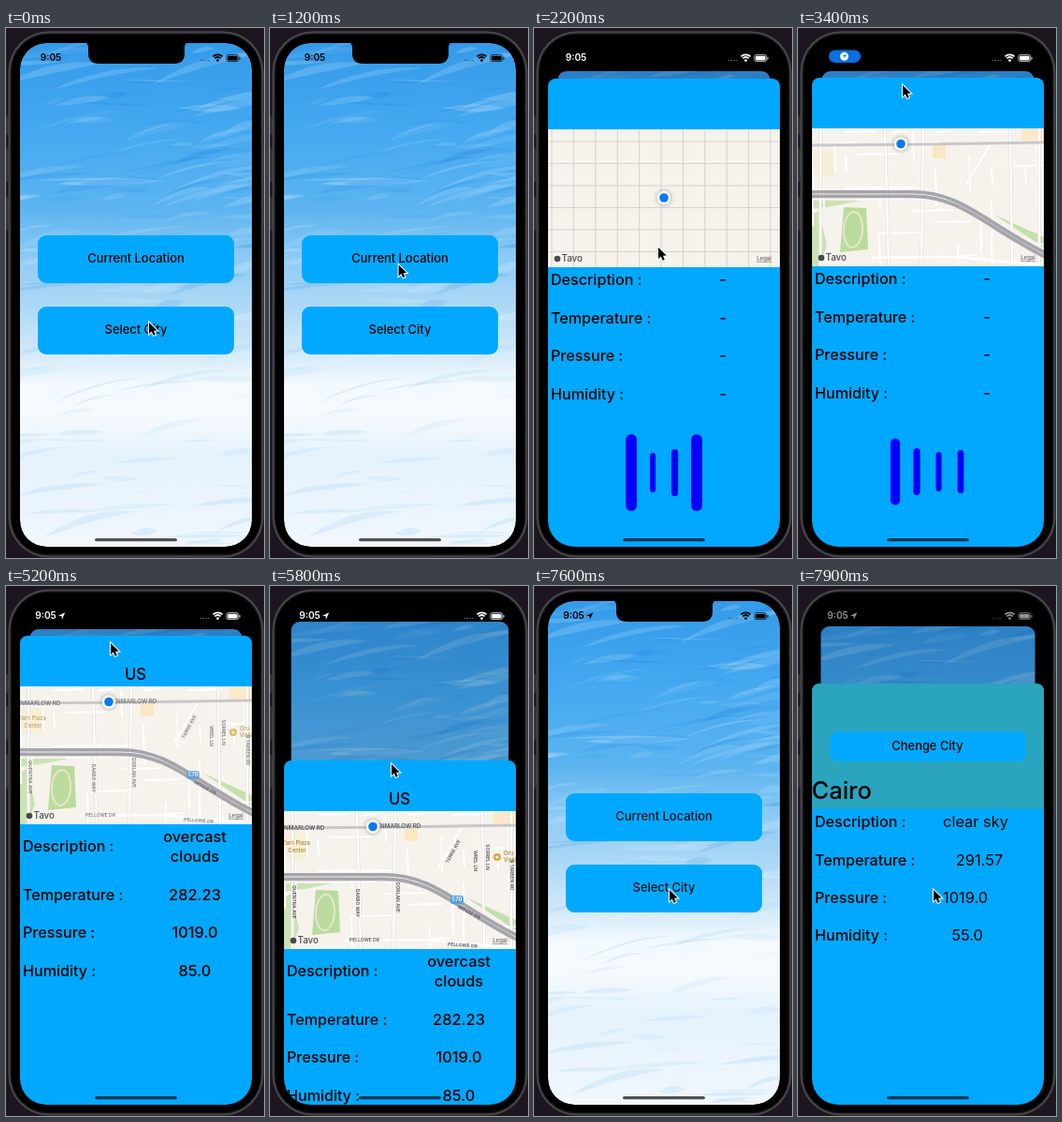
An HTML page with a canvas for the animation above (8 s loop, 276 px wide and 565 px high).

```html
<!DOCTYPE html>
<html lang="en">
<head>
<meta charset="utf-8">
<title>Weather app</title>
<style>
  html, body { margin: 0; width: 100%; height: 100%; overflow: hidden; background: #1d1620; }
  canvas { display: block; width: 276px; height: 565px; }
</style>
</head>
<body>
<canvas id="stage"></canvas>
<script>
const W = 276, H = 565, LOOP = 8000;
const SCREEN = { x: 15, y: 16, w: 248, h: 537 };
const REST = 53, BLUE = '#00a9ff', FONT = 'Inter, Roboto, sans-serif';
const dpr = window.devicePixelRatio || 1;

function makeCanvas(canvas) {
  canvas.width = W * dpr;
  canvas.height = H * dpr;
  const context = canvas.getContext('2d');
  context.scale(dpr, dpr);
  return context;
}
const g = makeCanvas(document.getElementById('stage'));

// The picture only moves inside these spans, in steps of 100 ms.
const ACTIVE = [[0, 0], [200, 1900], [2100, 2200], [2900, 3000], [3300, 3400], [3800, 3900], [4100, 4100],
  [4400, 4700], [4900, 5200], [5600, 5800], [6200, 6200], [6500, 6500], [7500, 7900]];

function heldTime(ms) {
  const span = ACTIVE.filter(([start]) => start <= ms).pop();
  return Math.min(Math.floor(ms / 100) * 100, span[1]);
}

const CURSOR = [[200, 153, 314], [1500, 133, 234], [2200, 133, 234], [3000, 120, 110], [3300, 112, 61],
  [5500, 112, 61], [5800, 130, 190], [6200, 132, 194], [6500, 141, 401], [7400, 141, 401], [7600, 145, 324]];
const SHEET_TOP = [[1600, 553], [1700, 465], [1800, 267], [1900, 134], [2100, 58], [2200, 54], [2900, 53],
  [5500, 53], [5800, 186], [6200, 190], [6500, 406], [7400, 406], [7500, 553], [7600, 553], [7700, 465],
  [7800, 262], [7900, 104]];
const HOME_TEXT = [[1500, 1], [1800, .65], [2100, .3], [6500, .3], [7500, 1], [7700, .8], [7900, .4]];
const LABELS = [[4100, 0], [4400, .3], [5200, .75], [5600, 1]];

function track(keys, t, column = 1) {
  const next = keys.findIndex(key => key[0] > t);
  if (next === 0) return keys[0][column];
  if (next < 0) return keys[keys.length - 1][column];
  const a = keys[next - 1], b = keys[next];
  return a[column] + (b[column] - a[column]) * (t - a[0]) / (b[0] - a[0]);
}

function box(c, x, y, w, h, r, fill) {
  c.beginPath();
  c.roundRect(x, y, w, h, r);
  c.fillStyle = fill;
  c.fill();
}

function circle(x, y, r, fill) {
  g.beginPath();
  g.arc(x, y, r, 0, 7);
  g.fillStyle = fill;
  g.fill();
}

function path(points, color, width, closed) {
  g.beginPath();
  points.forEach(([x, y]) => g.lineTo(x, y));
  if (closed) {
    g.closePath();
    g.fillStyle = color;
    g.fill();
  } else {
    g.strokeStyle = color;
    g.lineWidth = width;
    g.stroke();
  }
}

function text(str, x, y, size, { color = '#000', weight = 500, align = 'center', turn = 0 } = {}) {
  g.save();
  g.translate(x, y);
  g.rotate(turn * Math.PI / 180);
  g.font = `${weight} ${size}px ${FONT}`;
  g.textAlign = align;
  g.textBaseline = 'middle';
  g.fillStyle = color;
  g.fillText(str, 0, 0);
  g.restore();
}

function clipTo(x, y, w, h, r) {
  g.beginPath();
  g.roundRect(x, y, w, h, r);
  g.clip();
}

function randomFrom(seed) {
  return () => (seed = seed * 16807 % 2147483647) / 2147483647;
}

// Painted sky, brushed once and reused.
const sky = document.createElement('canvas');
function paintSky() {
  const c = makeCanvas(sky), rnd = randomFrom(77);
  const fill = c.createLinearGradient(0, 16, 0, 553);
  [[0, '#359ae8'], [.16, '#43a8f0'], [.33, '#5cb4f0'], [.42, '#8bcaf5'], [.52, '#acd8f6'], [.61, '#d0e8f9'],
    [.68, '#f5fafe'], [.74, '#f6fafe'], [.82, '#e5f2fc'], [1, '#f1f7fd']].forEach(s => fill.addColorStop(...s));
  c.fillStyle = fill;
  c.fillRect(0, 0, W, H);
  for (let i = 0; i < 230; i++) {
    const x = rnd() * 290 - 30, y = 10 + rnd() * 545, length = 25 + rnd() * 95, rise = length * (rnd() * .35 - .05);
    const thick = 1 + rnd() * 7, upper = y < 300, light = rnd() < (upper ? .55 : .6);
    const alpha = (upper ? .07 : .13) + rnd() * .14;
    c.beginPath();
    c.moveTo(x, y);
    c.quadraticCurveTo(x + length * .5, y - rise - thick, x + length, y - rise);
    c.quadraticCurveTo(x + length * .6, y - rise + thick, x, y);
    c.fillStyle = light ? `rgba(225,243,255,${alpha})` : upper ? `rgba(20,125,220,${alpha})` : `rgba(150,205,242,${alpha})`;
    c.fill();
  }
}

function drawHome(t, top) {
  const progress = (top - REST) / 500, scale = 1 - .085 * (1 - progress), raised = progress < .99;
  g.save();
  g.translate(139, 16 + 30 * (1 - progress));
  g.scale(scale, scale);
  g.translate(-139, -16);
  clipTo(SCREEN.x, SCREEN.y, SCREEN.w, SCREEN.h, raised ? 10 : 28);
  g.drawImage(sky, 0, 0, W, H);
  const color = `rgba(0,0,0,${track(HOME_TEXT, t)})`;
  [['Current Location', 221], ['Select City', 297]].forEach(([label, y]) => {
    box(g, 34, y, 210, 51, 9, BLUE);
    text(label, 139, y + 25.5, 12.9, { color });
  });
  g.fillStyle = `rgba(10,20,40,${.2 * (1 - progress)})`;
  g.fillRect(0, 0, W, H);
  g.restore();
}

function drawGrid() {
  for (let x = 4; x < 248; x += 23.4) path([[x, 0], [x, 147]], '#d6d3d0', 1);
  for (let y = 13; y < 147; y += 23.5) path([[0, y], [248, y]], '#d6d3d0', 1);
}

function drawFreeway(offset) {
  g.beginPath();
  g.moveTo(0, 70 + offset);
  g.lineTo(105, 70 + offset);
  g.bezierCurveTo(160, 69 + offset, 185, 103 + offset, 250, 135 + offset);
  g.lineWidth = 3.6;
  g.strokeStyle = '#a5a5ab';
  g.stroke();
}

function drawRoads() {
  const rnd = randomFrom(41);
  box(g, 129, 17, 14, 15, 1, '#fae8c4');
  box(g, 224, 0, 24, 14, 1, '#fbe9c9');
  box(g, 0, 23, 26, 28, 1, '#f8efd9');
  path([[0, 92], [7, 88], [16, 125], [8, 147], [0, 147]], '#cbe3b4', 0, true);
  path([[34, 84], [58, 85], [60, 129], [30, 132]], '#b9dc9c', 0, true);
  path([[0, 77], [52, 77], [22, 83], [0, 86]], '#cbe3b4', 0, true);
  path([[195, 92], [248, 116], [248, 127]], '#c4e0aa', 0, true);
  g.beginPath();
  g.ellipse(44, 108, 10, 19, .06, 0, 7);
  g.lineWidth = 2;
  g.strokeStyle = '#e9e3cb';
  g.stroke();
  for (let i = 0; i < 46; i++) {
    const x = Math.floor(rnd() * 22) * 12, y = 4 + Math.floor(rnd() * 12) * 12, length = 15 + rnd() * 38;
    if (x < 64 && y > 76 && y < 136) continue;
    path(rnd() < .5 ? [[x, y], [x + length, y - 1]] : [[x, y], [x + 1, y + length]], '#fff', 1.8);
  }
  [[9, 0], [78, 4], [119, -2], [212, 2], [243, 0]].forEach(([x, lean]) => {
    path([[x, 0], [x + lean, 147]], '#dedbd9', 3.4);
    path([[x, 0], [x + lean, 147]], '#fff', 2.4);
  });
  path([[165, 60], [190, 18]], '#fff', 2);
  path([[64, 138], [150, 137], [248, 146]], '#fff', 2.4);
  path([[0, 18], [120, 17], [248, 15]], '#c9c8ca', 3.2);
  drawFreeway(-2.2);
  drawFreeway(2.4);
}

function drawLabels(alpha) {
  const street = { color: '#55555a', weight: 600 }, place = { color: '#a8842f', weight: 500 };
  g.globalAlpha = alpha;
  [['FENMARLOW RD', 121, 16, 6.2, 0], ['FENMARLOW RD', 18, 18, 6.2, 0], ['TERNE AVE', 181, 43, 5, -62],
    ['WREL LN', 204, 53, 5, 90], ['SORREL LN', 217, 49, 5, 90], ['N TARBEN RD', 243, 68, 5, 90],
    ['QUENTRA AVE', 10, 97, 5, 90], ['DARBO WAY', 78, 98, 5, 90], ['DORLAN AVE', 121, 92, 5, 90],
    ['PELLOWE DR', 86, 137, 5, 0], ['MOSSE DR', 198, 108, 5, 28], ['PELLOWE DR', 191, 143, 5, 4]]
    .forEach(([name, x, y, size, turn]) => text(name, x, y, size, { ...street, turn }));
  text('Tarn Plaza', 28, 34, 6, { ...place, align: 'right' });
  text('Center', 14, 42, 6, place);
  circle(228, 49, 4, '#d6a83c');
  circle(228, 49, 1.6, '#fff');
  text('Oru', 235, 45, 6, { ...place, align: 'left' });
  text('Vista', 235, 52, 6, { ...place, align: 'left' });
  box(g, 178, 90, 14, 9, 3, '#4da3d8');
  text('570', 185, 94.7, 6, { color: '#fff', weight: 600 });
  g.globalAlpha = 1;
}

function drawMap(t, top) {
  const loaded = t >= 2900, drift = t >= 6500 ? -2 : 0;
  g.save();
  g.translate(15, top + 54);
  clipTo(0, 0, 248, 147, 0);
  g.fillStyle = '#f6f2ec';
  g.fillRect(0, 0, 248, 147);
  g.save();
  g.translate(drift, 0);
  if (loaded) drawRoads(); else drawGrid();
  if (loaded) drawLabels(track(LABELS, t));
  if (t >= 2100) {
    const [x, y] = loaded ? [95, 16.5] : [124, 73];
    g.shadowColor = 'rgba(0,0,0,.35)';
    g.shadowBlur = 5 * dpr;
    circle(x, y, 7.3, '#fff');
    g.shadowColor = 'transparent';
    circle(x, y, 4.8, '#087af2');
  }
  g.restore();
  circle(10, 138, 3.3, '#4a4a4c');
  text('Tavo', 14.5, 138, 9.8, { color: '#4a4a4c', align: 'left' });
  text('Legal', 231, 138.5, 6, { color: '#666' });
  path([[223, 141.5], [239, 141.5]], '#777', .6);
  g.restore();
}

function drawRows(top, ys) {
  ['Description :', 'Temperature :', 'Pressure :', 'Humidity :'].forEach((label, i) =>
    text(label, 18, top + ys[i], 16.1, { align: 'left' }));
}

function drawBars(t, top) {
  const phase = (t - 2200) / 1200;
  [[104, 0, 7.38], [127, Math.PI, 7.21], [150.5, 2.21, 7.21], [174, 0, 8.78]].forEach(([x, start, speed]) => {
    const h = 62 + 20 * Math.cos(start + phase * speed), w = h * .145;
    box(g, x - w / 2, top + 420 - h / 2, w, h, w / 2, '#0000ff');
  });
}

function openSheet(top) {
  clipTo(SCREEN.x, top, SCREEN.w, 560, [8, 8, 0, 0]);
  g.fillStyle = BLUE;
  g.fillRect(0, top, W, 560);
}

function drawLocationSheet(t, top) {
  const ready = t >= 4400;
  g.save();
  openSheet(top);
  drawMap(t, top);
  drawRows(top, ready ? [225.5, 277, 317, 358] : [215.5, 256, 296.5, 337]);
  if (ready) {
    text('US', 138.5, top + 41.5, 16.7);
    [['overcast', 215.5], ['clouds', 236.5], ['282.23', 277], ['1019.0', 317], ['85.0', 358]]
      .forEach(([value, y]) => text(value, 202, top + y, 16.4));
  } else {
    [215.5, 256, 296.5, 337].forEach(y => text('-', 202, top + y, 16.4));
    drawBars(t, top);
  }
  g.restore();
}

function drawCitySheet(top) {
  g.save();
  openSheet(top);
  g.fillStyle = '#2ba4bd';
  g.fillRect(0, top, W, 133.5);
  box(g, 34, top + 51, 210, 32, 9, BLUE);
  text('Chenge City', 138.5, top + 67.5, 12.9);
  text('Cairo', 14.5, top + 115, 25.5, { align: 'left' });
  drawRows(top, [148.5, 189, 229, 269.5]);
  [['clear sky', 190, 148.5], ['291.57', 194, 189], ['1019.0', 179, 229], ['55.0', 181, 269.5]]
    .forEach(([value, x, y]) => text(value, x, top + y, 16.4, { weight: 400 }));
  g.restore();
}

function statusColor(t) {
  if (t < 1700) return '#000';
  if (t < 1900) return 'rgba(20,30,45,.75)';
  if (t < 2100) return '#888';
  if (t < 6500) return '#fff';
  if (t < 7500) return 'rgba(255,255,255,.62)';
  return t < 7800 ? '#000' : '#8f9296';
}

function drawArrow(x, y, size, color) {
  path([[x + size, y - size], [x + size * .1, y + size], [x, y], [x - size, y - size * .1]], color, 0, true);
}

function drawStatus(t) {
  const color = statusColor(t);
  if (t >= 3300 && t < 3800) {
    box(g, 33, 23.5, 34, 13.5, 6.7, '#0a6fe0');
    circle(49.5, 30.3, 4.5, '#fff');
    drawArrow(49.5, 30.3, 2.3, '#0a6fe0');
  } else {
    const located = t >= 4100;
    text('9:05', located ? 42.5 : t >= 2100 ? 45 : 48, 32.3, 10.2, { color, weight: 600 });
    if (located) drawArrow(59.5, 32, 3.7, color);
  }
  g.globalAlpha = .4;
  if (t < 6500 || t >= 7500) for (let i = 0; i < 4; i++) circle(208.5 + i * 2.8, 34.5, .8, color);
  g.globalAlpha = 1;
  g.strokeStyle = color;
  g.lineWidth = 1.7;
  [4.8, 7.6].forEach(r => {
    g.beginPath();
    g.arc(226.5, 36, r, -2.3, -.84);
    g.stroke();
  });
  circle(226.5, 34.6, 1.4, color);
  g.lineWidth = .7;
  g.beginPath();
  g.roundRect(235.8, 28.6, 13, 7, 2.2);
  g.stroke();
  box(g, 237, 29.8, 10.6, 4.6, 1.2, color);
  box(g, 249.5, 31, 1, 2.4, .5, color);
}

function drawCursor(x, y) {
  g.save();
  g.translate(x, y);
  g.beginPath();
  [[0, 0], [0, 12], [2.8, 9.6], [4.7, 13.8], [6.8, 12.9], [5, 8.7], [8.7, 8.6]].forEach(([px, py]) => g.lineTo(px, py));
  g.closePath();
  g.lineWidth = 2;
  g.strokeStyle = '#fff';
  g.stroke();
  g.fillStyle = '#000';
  g.fill();
  g.restore();
}

function drawPhone() {
  g.fillStyle = '#1d1620';
  g.fillRect(0, 0, W, H);
  [[94, 20], [128, 36], [180, 36]].forEach(([y, h]) => box(g, 0, y, 3, h, 1, '#303033'));
  box(g, 2.5, 3.5, 273, 561, 43, '#48474b');
  box(g, 4.5, 5.5, 269, 557, 41, '#171619');
  box(g, 6, 7, 266, 554, 39, '#000');
}

function drawNotch() {
  g.beginPath();
  g.moveTo(84, 15);
  g.quadraticCurveTo(88, 16, 88, 21);
  g.lineTo(88, 27);
  g.quadraticCurveTo(88, 38, 99, 38);
  g.lineTo(180, 38);
  g.quadraticCurveTo(191, 38, 191, 27);
  g.lineTo(191, 21);
  g.quadraticCurveTo(191, 16, 195, 15);
  g.fillStyle = '#000';
  g.fill();
}

function draw(t) {
  const top = track(SHEET_TOP, t);
  g.setTransform(dpr, 0, 0, dpr, 0, 0);
  drawPhone();
  g.save();
  clipTo(SCREEN.x, SCREEN.y, SCREEN.w, SCREEN.h, 28);
  drawHome(t, top);
  if (top < 553) {
    if (t < 7500) drawLocationSheet(t, top); else drawCitySheet(top);
  }
  box(g, 95, 544, 88, 3.2, 1.6, t >= 6500 && t < 7500 ? '#000' : 'rgba(0,0,0,.68)');
  g.restore();
  drawNotch();
  drawStatus(t);
  drawCursor(track(CURSOR, t), track(CURSOR, t, 2));
}

paintSky();
function tick() {
  draw(heldTime(performance.now() % LOOP));
  requestAnimationFrame(tick);
}
tick();
</script>
</body>
</html>
```
